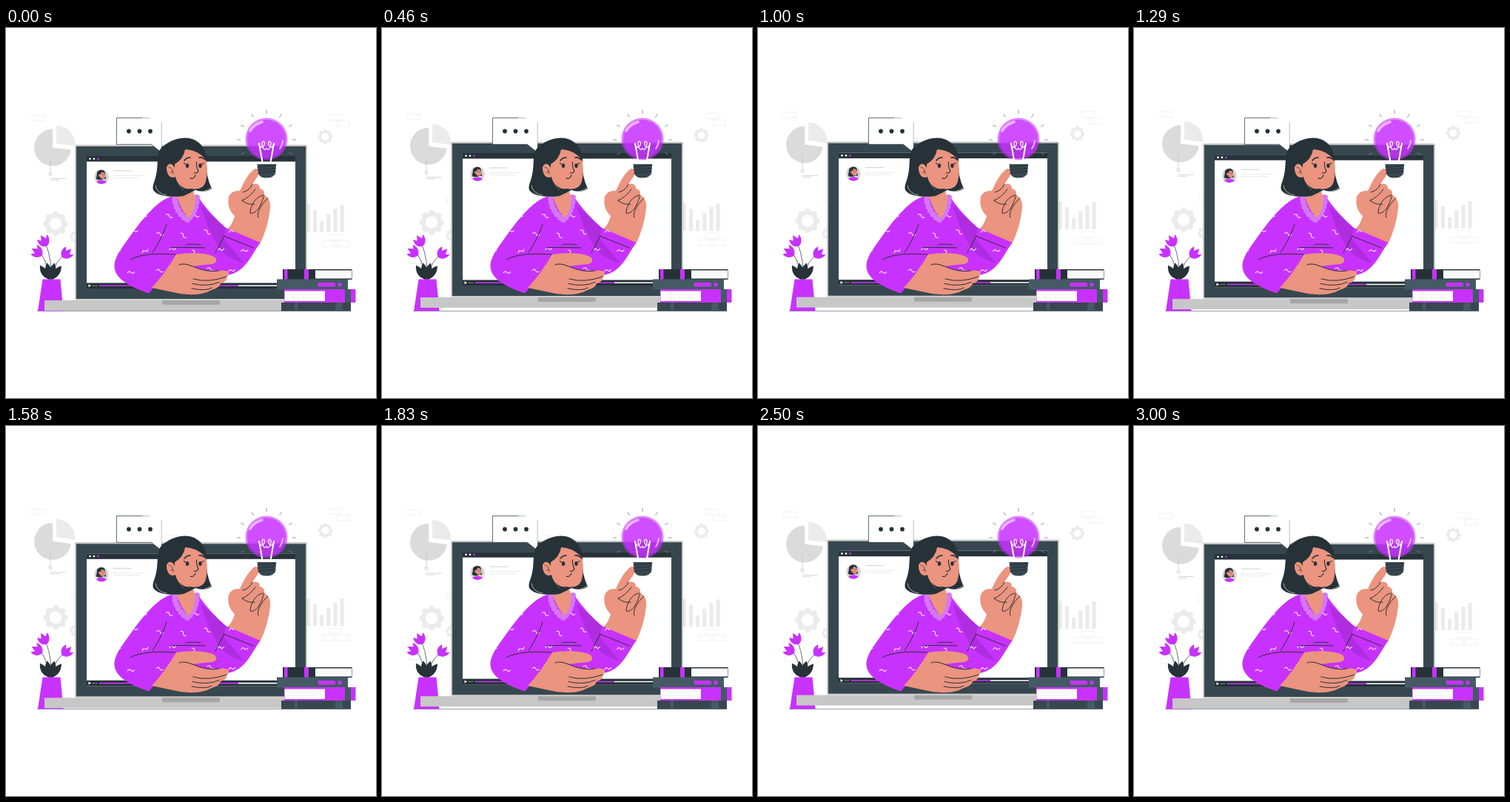
An HTML page that plays this animation: 500x500 px, repeating every 3.04 s.

```html
<!DOCTYPE html>
<html lang="en">
<head>
<meta charset="utf-8">
<title>Online lesson</title>
<style>
  html, body { margin: 0; width: 100%; height: 100%; overflow: hidden; background: #fff; }
  svg { display: block; width: 100%; height: 100%; }
  .ink { fill: none; stroke: #263238; stroke-linecap: round; stroke-linejoin: round; }
  .thin { stroke-width: .7; }
  .chalk { fill: none; stroke: #fff; stroke-linecap: round; stroke-linejoin: round; }
  .dark { fill: #263238; }
  .slate { fill: #37474f; }
  .steel { fill: #455a64; }
  .purple { fill: #c832ff; }
  .skin { fill: #eb947f; }
  .white { fill: #fff; }
  .light { fill: #ebebeb; }
  .frame { fill: none; stroke: #ebebeb; stroke-width: .7; }
</style>
</head>
<body>
<svg viewBox="0 0 500 500" xmlns="http://www.w3.org/2000/svg">
  <defs>
    <path id="tulip" d="M0 0C-7 -2 -9 -8 -7 -14L-3 -10L0 -17L4 -10L8 -14C9 -8 7 -2 0 0Z"/>
    <path id="leaf" d="M0 0Q-9 -12 0 -23Q8 -11 0 0Z"/>
    <path id="blouse" d="M228 227C205 230 183 260 163 288C143 315 130 337 193 358.500L214 334L232 345L276 330C286 335 298 336 309 331C325 324 332 307 343.500 290L297 270Q276 252 260 229Z"/>
    <clipPath id="cloth"><use href="#blouse"/></clipPath>
    <clipPath id="portrait"><circle r="10"/></clipPath>
  </defs>

  <g id="backdrop">
    <g id="frames" class="frame"></g>
    <path fill="#dbdbdb" d="M63 161.500V136.500A25 25 0 1 0 87.800 164.700Z"/>
    <path class="light" d="M68 156V131.500A25.500 25.500 0 0 1 93.200 159.500Z"/>
    <path d="M60 176V195M60 203.500H80.500M60 205.500H72" stroke="#c4c4c4" stroke-width=".7"/>
    <circle cx="60" cy="197" r="1.900" fill="#fff" stroke="#b8b8b8" stroke-width=".7"/>
    <g id="gears"></g>
    <g id="bars" class="light"></g>
  </g>

  <path d="M42 382.500H466" stroke="#455a64" stroke-width=".6"/>

  <g id="plant">
    <path class="ink thin" d="M60 341Q63 314 54 293M62 341Q62 322 76 309M58 341Q57 319 48 306"/>
    <g class="purple">
      <use href="#tulip" transform="translate(55 295) rotate(-28)"/>
      <use href="#tulip" transform="translate(49 307) rotate(-58)"/>
      <use href="#tulip" transform="translate(76 310) rotate(46)"/>
      <path d="M49.500 339.500H73.500L77.500 382.500H43Z"/>
    </g>
    <g id="leaves" class="dark"></g>
  </g>

  <g id="laptop">
    <rect x="93" y="157.800" width="314" height="210" rx="2" fill="#c7c7c7"/>
    <rect class="slate" x="95" y="160" width="310" height="206"/>
    <rect class="white" x="109" y="173" width="282" height="179"/>
    <rect class="dark" x="109" y="173" width="282" height="7.500"/>
    <rect class="dark" x="109" y="344.500" width="282" height="7.500"/>
    <g id="buttons"></g>
    <path class="white" d="M111.500 346.300L115 348.300L111.500 350.300Z"/>
    <path d="M117 348.300H123.500" stroke="#aaa" stroke-width="1.200" stroke-dasharray="1 .7"/>
    <path d="M314 348.300H366" stroke="#fff" stroke-width="1.600"/>
    <path d="M126 348.300H314" stroke="#c832ff" stroke-width="1.600"/>
    <g transform="translate(129 201)" clip-path="url(#portrait)">
      <circle r="10" fill="#d5d5d5"/>
      <ellipse class="purple" cy="10" rx="8" ry="5.500"/>
      <use href="#head" transform="translate(-41 -34.500) scale(.17)"/>
    </g>
    <path d="M145 193H170" stroke="#cfcfcf"/>
    <path d="M145 199.500H187.500M145 202.500H181" stroke="#e4e4e4" stroke-width=".8"/>
    <rect x="52" y="368" width="325" height="14" fill="#c7c7c7"/>
    <path d="M211 368H289V372Q289 374 287 374H213Q211 374 211 372Z" fill="#a6a6a6"/>
  </g>

  <g id="bubble">
    <path class="white" d="M149.500 121.500H210V166L206 165L196 157.300H149.500Z"/>
    <path class="ink thin" d="M184 121.500H149.500V157.300H196.500L206 165"/>
    <path d="M184 121.500H194M210.200 127V158" fill="none" stroke="#8b9498" stroke-width=".6"/>
    <g id="typing" class="dark"></g>
  </g>

  <g id="woman">
    <path class="skin" d="M316 220Q325 199 335 191C341 188 344 193 341 199L333 211Q343 209 343 217Q350 218 349 226C355 228 358 236 357 244Q354 270 343 292L296 275Q307 265 309 254C301 247 299 236 301 228Q305 219 316 220Z"/>
    <path class="ink" d="M319 233Q329 229 337 218M319 233Q328 240 336 238M349 226C340 226 331 236 330 250C338 252 345 240 348 228M354 230C345 238 338 250 341 256M333 211Q329 220 320 222"/>

    <use href="#blouse" class="purple"/>
    <path d="M263 240L297 270L294 284L322 318Q300 313 288 297Q272 272 263 240Z" opacity=".12"/>
    <g id="pattern" class="chalk" clip-path="url(#cloth)"></g>
    <path class="ink" d="M168 313Q185 303 229 306M217 265Q212 282 198 304M222 297Q240 296 269 297M243 293Q252 291 263 293M295 281L283 304M294 281L334 297"/>

    <g id="lace" fill="#d478f6"></g>
    <path class="skin" d="M234 207L231 228Q236 246 247 257Q256 246 256 229L250 212Z"/>

    <g id="head">
      <path class="dark" d="M241 148.500C227 149 216 156 209 163C203 171 206 185 203 198C201 208 197 213 199 219C205 228 225 229 240 227L256 219Q268 224 278 217Q270 200 271 183C273 166 262 148 241 148.500Z"/>
      <path class="skin" d="M228 184Q240 177 242 164Q260 165 270 178C273 188 272 202 269 210C266 217 257 219 249 217L249 222Q240 222 235 213Q230 207 229 201C222 205 217 197 217 190C217 183 224 181 228 189Z"/>
      <path class="dark" d="M235 211Q240 219 250 217L249.500 223Q239 222 235 211Z"/>
      <path class="ink thin" d="M220 188Q226 189 226 197M222 195Q224 193 226 195"/>
      <path class="ink" stroke-width="1.700" d="M241 179Q244 175 249 175M261 175Q266 174 269 178"/>
      <ellipse class="dark" cx="245" cy="186" rx="2.200" ry="3"/>
      <ellipse class="dark" cx="262.500" cy="186" rx="2.200" ry="3"/>
      <path class="ink" stroke-width="1.100" d="M242 184L240.500 182.500M265 184L267 182.500M257.500 181Q257 188 260 193Q258 197 254 196M249 203Q253 205 256 199"/>
      <path class="chalk" stroke-width=".6" d="M257 220Q266 224 277 216M202 213Q204 224 217 226"/>
    </g>

    <path class="skin" d="M230 306C244 304 265 303 279 308C286 311 286 317 279 319Q265 320 252 322Q270 330 287 328C298 326 305 330 299 336Q298 344 290 345Q289 351 278 354C264 362 245 361 230 358L197 351Q213 334 230 306Z"/>
    <path class="ink" d="M234 320Q240 317 252 322Q272 331 288 328"/>
    <g id="fingers" class="ink"></g>
  </g>

  <g id="bulb">
    <g id="rays" stroke="#7b858a" stroke-width=".8"></g>
    <circle class="purple" cx="352" cy="150" r="28.500" opacity=".6"/>
    <circle class="purple" cx="352" cy="150" r="26" opacity=".65"/>
    <path d="M330 139Q335 130 346 127" fill="none" stroke="#ecb5ff" stroke-width="3.500" stroke-linecap="round"/>
    <path d="M374 152Q373 159 370 163" fill="none" stroke="#ecb5ff" stroke-width="1.800" stroke-linecap="round"/>
    <path class="chalk" stroke-width="2" d="M347 184L342 156M357 184L362 156"/>
    <path class="chalk" stroke-width="1.200" d="M342 157Q345 164 348 160C352 153 346 151 346 156C346 163 351 167 352 162C353 167 358 163 358 156C358 151 352 153 356 160Q359 164 362 157"/>
    <path class="slate" d="M339.500 184H365L364 197Q360 203 352 202.500Q344 203 341 197Z"/>
    <g id="thread" class="ink"></g>
  </g>

  <g id="books">
    <rect class="dark" x="374" y="326" width="93.500" height="14"/>
    <rect class="purple" x="376" y="326" width="4.500" height="14"/>
    <rect class="purple" x="403" y="326" width="6" height="14"/>
    <rect class="white" x="418" y="327.500" width="49" height="11"/>
    <rect class="steel" x="366" y="339.500" width="96" height="14"/>
    <rect class="purple" x="421.500" y="344" width="23.500" height="5.500"/>
    <circle class="purple" cx="451" cy="346.700" r="2.700"/>
    <rect class="purple" x="376" y="353" width="96.500" height="18"/>
    <rect class="white" x="376.500" y="355.500" width="54.500" height="13.500"/>
    <rect class="steel" x="458" y="353" width="8" height="18"/>
    <path d="M421 331H463M420 334H460M380 360H426M378 364H421" stroke="#dedede" stroke-width=".6"/>
    <rect class="slate" x="372" y="371" width="94" height="11.500"/>
    <rect class="steel" x="390" y="371" width="4" height="11.500"/>
    <rect class="steel" x="445" y="371" width="10" height="11.500"/>
  </g>
</svg>

<script>
  const byId = id => document.getElementById(id);
  const repeat = (count, draw) => Array.from({ length: count }, (_, i) => draw(i)).join('');
  const fill = (id, count, draw) => { byId(id).innerHTML = repeat(count, draw); };

  let seed = 7;
  const random = () => (seed = seed * 16807 % 2147483647) / 2147483647;

  // Small empty labels hang in loose stacks around the edges.
  const label = (x, y) => `<rect x="${x}" y="${y}" width="17" height="7.500"/>`;
  byId('frames').innerHTML = label(35, 118) + label(36, 313) + label(87, 230) + label(215, 153)
    + repeat(2, i => label(437 + 10 * i, 117 + 9 * i) + label(428 + 19 * i, 288)) + label(437, 279);

  function gear(x, y, r) {
    const teeth = repeat(8, i => `<rect transform="rotate(${i * 45})" x="${-r * .2}" y="${-r}" width="${r * .4}" height="${r * .4}" rx="${r * .1}"/>`);
    return `<g class="light" transform="translate(${x} ${y})">${teeth}
      <circle r="${r * .68}" fill="none" stroke="#ebebeb" stroke-width="${r * .36}"/></g>`;
  }
  byId('gears').innerHTML = gear(67, 264.5, 16.5) + gear(94, 282, 8) + gear(431.5, 147, 10);

  // Bars dip at the third column and climb again towards the right.
  fill('bars', 6, i => {
    const height = 15 + 23 * Math.sin(i < 2 ? .7 * (2 - i) : .42 * (i - 2));
    return `<rect x="${405.7 + i * 9.15}" y="${276 - height}" width="5.300" height="${height}"/>`;
  });

  fill('leaves', 4, i => `<use href="#leaf" transform="translate(${58.5 + i} 340) rotate(${-33 + 23 * i})"/>`);
  fill('buttons', 3, i => `<circle class="${i < 2 ? 'white' : 'purple'}" cx="${113.5 + 5.5 * i}" cy="176.700" r="1.300"/>`);
  fill('typing', 3, i => `<circle cx="${166 + 14.5 * i}" cy="139.500" r="2.900"/>`);

  // Scallops follow the V of the neckline.
  fill('lace', 13, i => {
    const u = i / 6 - 1;
    const x = 245 + (u < 0 ? 17 : 13) * Math.sin(u * Math.PI / 2);
    return `<circle cx="${x}" cy="${259 - 30 * Math.abs(u) ** 1.3}" r="4"/>`;
  });

  // Squiggles sit on a staggered, slightly shaken grid; the blouse clips them.
  fill('pattern', 28, i => {
    const row = Math.floor(i / 7);
    const x = 150 + 34 * (i % 7) + 17 * (row % 2) + 8 * random();
    const y = 248 + 25 * row + 8 * random();
    return `<path transform="translate(${x} ${y}) rotate(${100 * random() - 40})" d="M-4.500 1Q-2.500 -2.500 0 0T4.500 -1"/>`;
  });

  fill('fingers', 3, i => `<path d="M${253 - i} ${339 + 6.5 * i}q20 ${6 - i} ${45 - 9 * i} ${-3 + i}"/>`);
  fill('thread', 3, i => `<path d="M${340 + i * .5} ${188 + 4 * i}l${25 - i} -2.500"/>`);
  fill('rays', 9, i => `<path transform="translate(352 151) rotate(${30 * i - 120})" d="M0 -35V-40"/>`);

  const LOOP = 3040;
  const triangle = (t, period) => 1 - Math.abs(1 - 2 * (t % period) / period);
  const lift = (id, height) => byId(id).setAttribute('transform', `translate(0 ${-height})`);

  function render(t) {
    lift('laptop', 6.5 * triangle(t, 1500));
    lift('backdrop', 6 * triangle(t, 3000));
  }

  let start;
  function tick(now) {
    start ??= now;
    render((now - start) % LOOP);
    requestAnimationFrame(tick);
  }
  render(0);
  requestAnimationFrame(tick);
</script>
</body>
</html>
```
